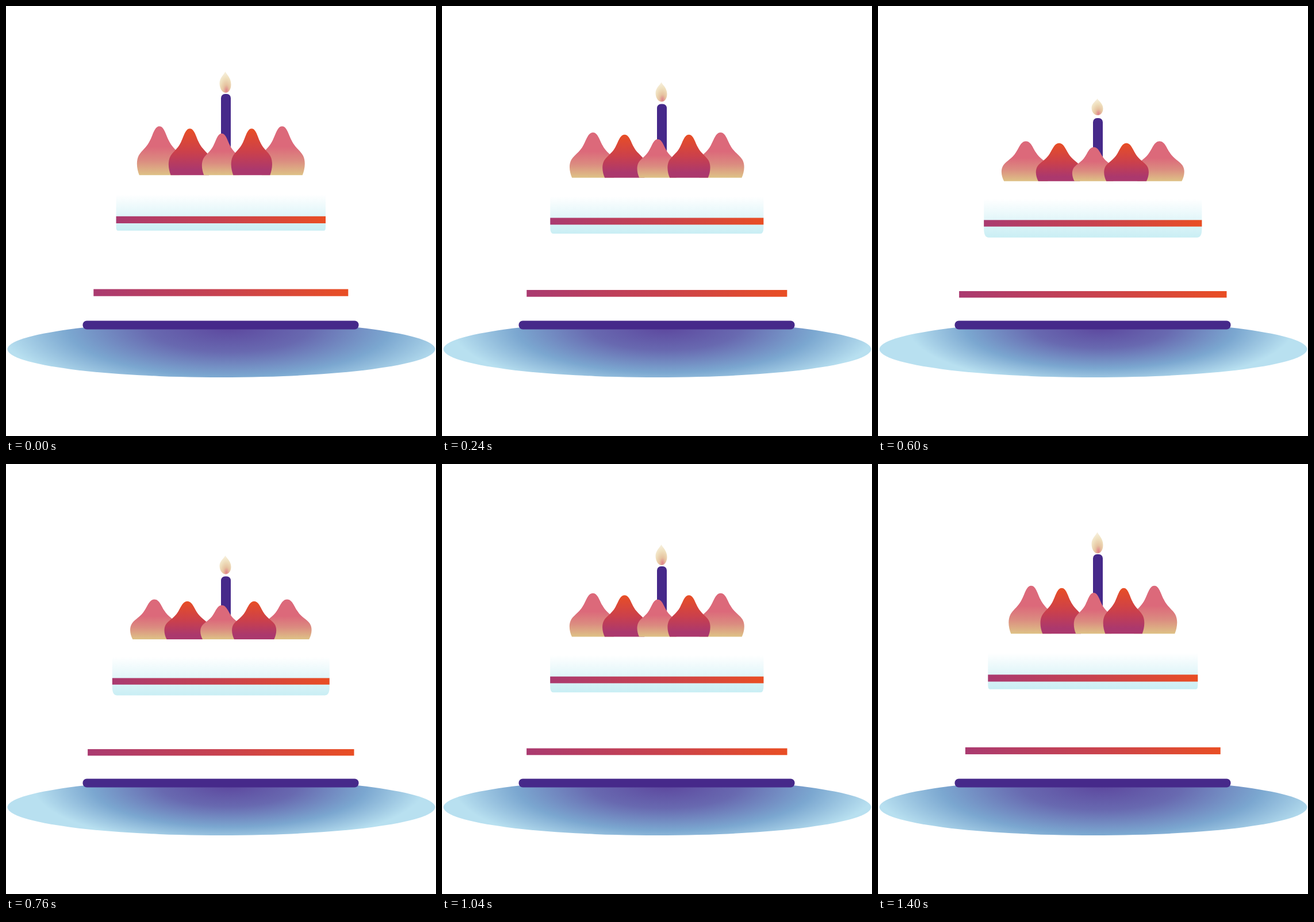
These frames come from a looping animation (748 px wide and 748 px high, 1440 ms). An HTML page:

```html
<!DOCTYPE html>
<html lang="en">
<head>
<meta charset="utf-8">
<title>Birthday cake</title>
<style>
  html, body { margin: 0; width: 100%; height: 100%; overflow: hidden; background: #fff; }
  svg { display: block; width: 100vw; height: 100vh; }
</style>
</head>
<body>
<svg viewBox="0 0 748 748">
  <defs>
    <linearGradient id="stripe">
      <stop offset="0" stop-color="#aa3a70"/>
      <stop offset=".5" stop-color="#c8424f"/>
      <stop offset="1" stop-color="#e94e24"/>
    </linearGradient>
    <linearGradient id="pink" x2="0" y2="1">
      <stop offset=".42" stop-color="#dc697a"/>
      <stop offset=".7" stop-color="#db8b80"/>
      <stop offset="1" stop-color="#dec286"/>
    </linearGradient>
    <linearGradient id="red" x2="0" y2="1">
      <stop offset="0" stop-color="#e84e25"/>
      <stop offset=".5" stop-color="#cb404b"/>
      <stop offset=".88" stop-color="#ab386d"/>
    </linearGradient>
    <linearGradient id="icing" x2="0" y2="1">
      <stop offset="0" stop-color="#fff"/>
      <stop offset="1" stop-color="#c9eef4"/>
    </linearGradient>
    <radialGradient id="fire" cx=".6" cy=".9" r=".9">
      <stop offset="0" stop-color="#e0828a"/>
      <stop offset=".3" stop-color="#e6c3a0"/>
      <stop offset=".65" stop-color="#efdfbd"/>
      <stop offset="1" stop-color="#f8f1e0"/>
    </radialGradient>
    <radialGradient id="plate" gradientUnits="userSpaceOnUse" cx="0" cy="0" r="1">
      <stop offset="0" stop-color="#5d489f"/>
      <stop offset=".35" stop-color="#6869b0"/>
      <stop offset=".7" stop-color="#7ba7d0"/>
      <stop offset="1" stop-color="#b8e0f0"/>
    </radialGradient>
  </defs>
  <ellipse cx="374.5" cy="597" rx="372" ry="49" fill="url(#plate)"/>
  <rect x="133.5" y="547.5" width="480" height="15" rx="7" fill="#46298a"/>
  <path id="tier" fill="url(#icing)"/>
  <rect id="upper" fill="url(#stripe)"/>
  <rect id="lower" fill="url(#stripe)"/>
  <rect id="candle" x="374" width="17" rx="7" fill="#46298a"/>
  <path id="flame" fill="url(#fire)"/>
  <g id="cream"></g>
</svg>
<script>
const LOOP = 1440, STEP = 40, MID = 373.8;
const $ = id => document.getElementById(id);
const set = (el, attrs) => { for (const k in attrs) el.setAttribute(k, attrs[k]); };

// [time, value] pairs, joined by straight lines
const sink = [[0, 0], [240, 17.5], [400, 28.5], [600, 42], [660, 44.5], [720, 44.5],
              [780, 41.5], [880, 35], [1200, 15], [1400, 4], [1440, 0]];
const spread = [[0, 0], [240, .45], [400, .73], [600, 1], [650, 1.03], [700, 1],
                [880, .73], [1200, .2], [1400, .04], [1440, 0]];
const flameHeight = [[0, 37], [240, 34], [400, 30], [600, 29], [880, 35], [1200, 37], [1440, 37]];
const flameGap = [[0, 2], [240, 4], [400, 5.5], [600, 5], [880, 3], [1200, 1], [1440, 1.5]];

function at(keys, t) {
  let i = 1;
  while (keys[i][0] < t) i++;
  const [t0, a] = keys[i - 1], [t1, b] = keys[i];
  return a + (b - a) * (t - t0) / (t1 - t0);
}

// Cream drops: centre, half width, height, fill; back to front
const drop = 'M-35,0C-39,-10 -41,-24 -36,-34C-31,-43 -22,-48 -16,-61C-11,-71 -8,-85 0,-85' +
             'C8,-85 11,-71 16,-61C22,-48 31,-43 36,-34C41,-24 39,-10 35,0Z';
for (const [x, w, h, fill] of [
  [-107, 39, 85, 'pink'], [106.5, 39.5, 85, 'pink'], [-54, 37, 81, 'red'],
  [1.5, 34.5, 72.5, 'pink'], [53.5, 35.7, 81, 'red']
]) {
  const p = document.createElementNS('http://www.w3.org/2000/svg', 'path');
  set(p, { d: drop, fill: `url(#${fill})`, transform: `translate(${x}) scale(${w / 39} ${h / 85})` });
  $('cream').append(p);
}

function bar(id, half, y, height) {
  set($(id), { x: MID - half, y, width: 2 * half, height });
}

function draw(t) {
  const v = at(sink, t), u = at(spread, t);

  set($('cream'), {
    transform: `translate(${MID} ${294.3 + .25 * v}) scale(${1 + .089 * u} ${1 - .0043 * v})`
  });

  const top = 153 + v;
  set($('candle'), { y: top, height: 125 - .9 * v });

  const h = at(flameHeight, t), base = top - at(flameGap, t);
  const y = k => base - k * h;
  set($('flame'), {
    d: `M381.5,${y(1)}C384,${y(.85)} 391.5,${y(.7)} 391.5,${y(.4)}` +
       `C391.5,${y(.15)} 387,${y(0)} 382,${y(0)}C376,${y(0)} 371.5,${y(.2)} 371.5,${y(.45)}` +
       `C371.5,${y(.7)} 379,${y(.85)} 381.5,${y(1)}Z`
  });

  // Upper tier with rounded lower corners
  const half = 182.2 + 7.4 * u, l = MID - half, r = MID + half;
  const floor = 390.8 + .155 * v + 5.5 * u, ry = 7 + 8 * u, rx = 2.5 + 6 * u;
  set($('tier'), {
    d: `M${l},${328 + .18 * v}H${r}V${floor - ry}Q${r},${floor} ${r - rx},${floor}` +
       `H${l + rx}Q${l},${floor} ${l},${floor - ry}Z`
  });
  bar('upper', half, 365.8 + .155 * v, 12.2 - .02 * v);
  bar('lower', 221.5 + 11.2 * u, 492.5 + .083 * v, 12.2 - .02 * v);

  const reach = 400 - 65 * u;
  set($('plate'), { gradientTransform: `translate(388 560) scale(${reach} ${reach * .3})` });
}

function tick(now) {
  draw(Math.floor(now % LOOP / STEP) * STEP);
  requestAnimationFrame(tick);
}
draw(0);
requestAnimationFrame(tick);
</script>
</body>
</html>
```
